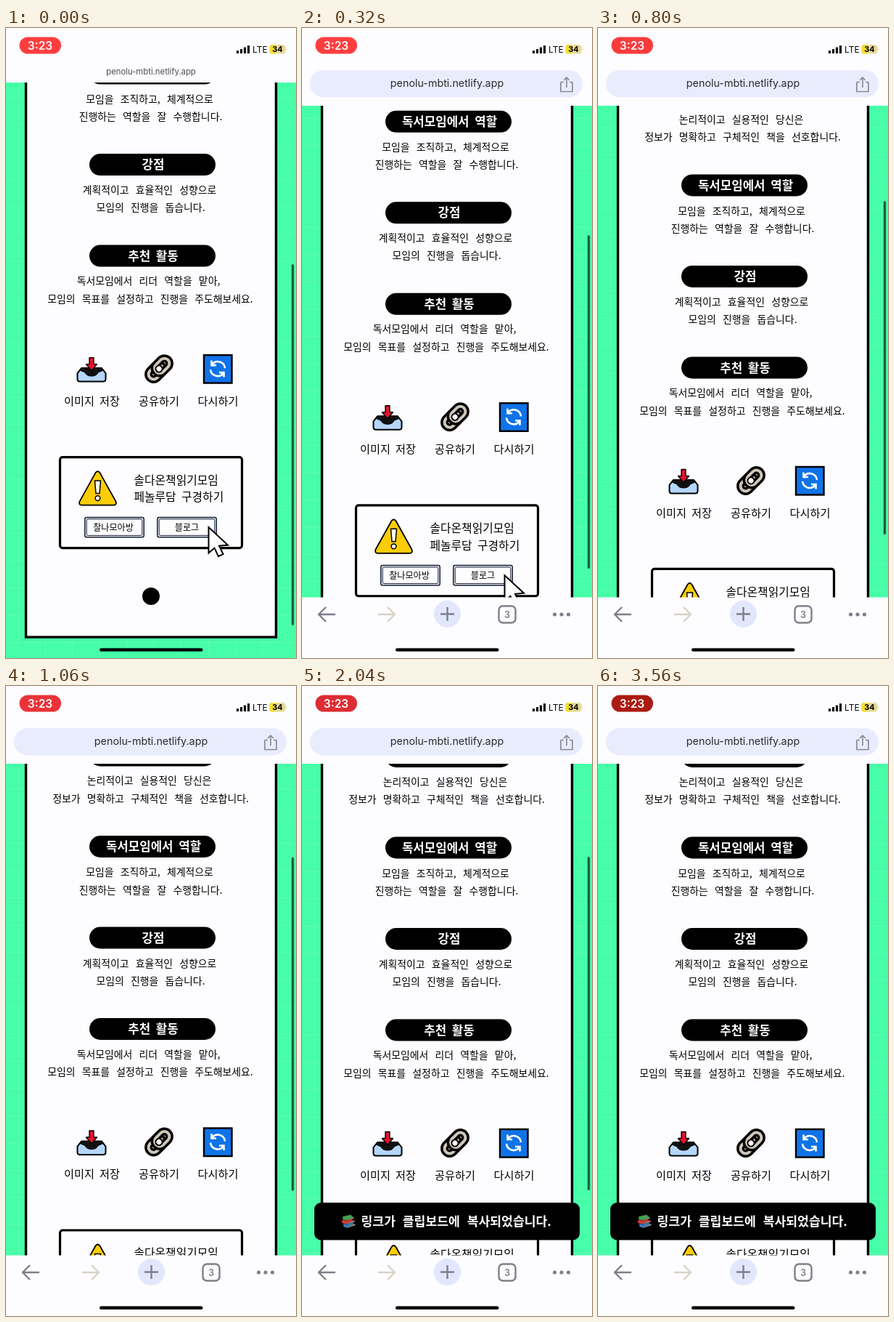
Write an HTML page that moves like this. It is 400 by 867 pixels and loops after 3.58 s.

```html
<!DOCTYPE html>
<html lang="ko">
<head>
<meta charset="utf-8">
<title>독서모임 유형</title>
<style>
html, body { margin: 0; width: 100%; height: 100%; overflow: hidden; background: #fdfcff; }
svg { display: block; width: 400px; height: 867px; font-family: "Noto Sans CJK KR", "Noto Sans CJK", sans-serif; font-weight: 500; }
.mid { text-anchor: middle; }
.copy { font-size: 13.9px; word-spacing: 5.3px; }
.title { font-size: 16.8px; font-weight: 700; fill: #fff; word-spacing: 3px; }
.note { font-size: 17.2px; font-weight: 700; fill: #fff; word-spacing: 5px; }
.label { font-size: 15.2px; word-spacing: 3px; }
.club { font-size: 15.8px; word-spacing: 3px; }
.btn { font-size: 12.1px; }
.ui { font-family: Inter, sans-serif; }
.ink { stroke: #000; stroke-linejoin: round; }

.page, .thumb, .head, .bar, .field, .url, .rec, .toast { animation: 3580ms linear infinite; }
.page { animation-name: scroll; }
.thumb { animation-name: thumb, hide; animation-duration: 3580ms, 3580ms; }
.head { animation-name: head; }
.bar { animation-name: bar; }
.field { animation-name: field; }
.url { animation-name: url; }
.rec { animation-name: rec; }
.toast { animation-name: toast; }

@keyframes scroll {
  0% { transform: translateY(0); animation-timing-function: cubic-bezier(.333,.129,.667,.515); }
  8.939% { transform: translateY(66px); animation-timing-function: cubic-bezier(.333,.37,.667,.744); }
  15.084% { transform: translateY(125.5px); animation-timing-function: cubic-bezier(.25,.75,.5,1); }
  29.609% { transform: translateY(158.5px); animation-timing-function: ease-out; }
  36.313%, 100% { transform: translateY(160px); }
}
@keyframes thumb {
  0% { transform: translateY(325px); height: 497px; animation-timing-function: cubic-bezier(.333,.129,.667,.515); }
  8.939% { transform: translateY(285.2px); height: 459px; animation-timing-function: cubic-bezier(.333,.37,.667,.744); }
  15.084% { transform: translateY(253.4px); height: 459px; animation-timing-function: cubic-bezier(.25,.75,.5,1); }
  29.609% { transform: translateY(235.7px); height: 459px; animation-timing-function: ease-out; }
  36.313%, 100% { transform: translateY(235px); height: 459px; }
}
@keyframes hide {
  0%, 82% { opacity: 1; }
  89%, 100% { opacity: 0; }
}
@keyframes head {
  0% { transform: translateY(-32px); animation-timing-function: cubic-bezier(.333,.129,.667,.515); }
  8.939%, 100% { transform: none; }
}
@keyframes bar {
  0% { transform: translateY(84px); animation-timing-function: cubic-bezier(.333,.129,.667,.515); }
  8.939%, 100% { transform: none; }
}
@keyframes field {
  0% { opacity: 0; transform: translateY(-16px); animation-timing-function: cubic-bezier(.333,.129,.667,.515); }
  8.939%, 100% { opacity: 1; transform: none; }
}
@keyframes url {
  0% { transform: translate(200px,60px) scale(.79); fill: #4c4c50; animation-timing-function: cubic-bezier(.333,.129,.667,.515); }
  8.939%, 100% { transform: translate(200px,76px) scale(1); fill: #2b2b30; }
}
@keyframes rec {
  0%, 20% { fill: #ff3d3f; }
  29.6% { fill: #ec3338; }
  43.6% { fill: #ac1b12; }
  57% { fill: #dc2d35; }
  64%, 78% { fill: #ff3d3f; }
  85.5% { fill: #ec3338; }
  99.4%, 100% { fill: #ac1b12; }
}
@keyframes toast {
  0%, 40.2% { opacity: 0; transform: translateY(10px); animation-timing-function: ease-out; }
  45.8%, 100% { opacity: 1; transform: none; }
}
</style>
</head>
<body>
<svg viewBox="0 0 400 867">
  <defs>
    <pattern id="grid" x="16" y="20" width="37.5" height="37.5" patternUnits="userSpaceOnUse">
      <path d="M.5 0V37.5M0 .5H37.5" stroke="#5cfdb2" fill="none"/>
    </pattern>
    <rect id="pill" x="115" y="-15" width="174" height="30" rx="15"/>
    <rect id="link" x="-11.5" y="-7" width="23" height="14" rx="7"/>
    <g id="frame" fill="none" stroke="#111a33">
      <rect x=".8" y=".8" width="81.4" height="27.4" rx="2.5" stroke-width="1.5"/>
      <rect x="3.2" y="3.2" width="76.6" height="22.6" rx="1.5"/>
    </g>
    <path id="turn" d="M10 -1A10 10 0 0 0 -7.5 -6.5M-8.5 -11.5V-5H-2" fill="none" stroke="#fff" stroke-width="2.6"/>
  </defs>

  <rect width="400" height="867" fill="#46fda8"/>
  <g class="page">
    <rect y="-180" width="400" height="1060" fill="url(#grid)"/>
    <rect x="27.5" y="-200" width="345" height="1038.2" fill="#fdfcff" stroke="#000" stroke-width="3.4"/>

    <use href="#pill" y="-63"/>
    <use href="#pill" y="62.5"/>
    <use href="#pill" y="188"/>
    <use href="#pill" y="313.5"/>
    <g class="title mid">
      <text x="203.5" y="62.5" dy=".36em">독서모임에서 역할</text>
      <text x="203" y="188" dy=".36em">강점</text>
      <text x="203" y="313.5" dy=".36em">추천 활동</text>
    </g>
    <g class="copy mid">
      <text x="197.5" y="-28.5" dy=".37em">논리적이고 실용적인 당신은</text>
      <text x="199.5" y="-4" dy=".37em">정보가 명확하고 구체적인 책을 선호합니다.</text>
      <text x="198" y="97.5" dy=".37em">모임을 조직하고, 체계적으로</text>
      <text x="199.5" y="122" dy=".37em">진행하는 역할을 잘 수행합니다.</text>
      <text x="198" y="223" dy=".37em">계획적이고 효율적인 성향으로</text>
      <text x="199.5" y="247" dy=".37em">모임의 진행을 돕습니다.</text>
      <text x="196.5" y="348" dy=".37em">독서모임에서 리더 역할을 맡아,</text>
      <text x="199" y="372.5" dy=".37em">모임의 목표를 설정하고 진행을 주도해보세요.</text>
    </g>

    <g class="ink" stroke-width="2">
      <path d="M104 468H132L137.5 475V483Q137.5 486.5 134 486.5H102Q98.5 486.5 98.5 483V475Z" fill="#b4d6fa"/>
      <path d="M104 468H132L134 471L127 474Q125 479 118 479T109 474L102 471Z" fill="#111" stroke-width="1"/>
      <path d="M115 453.5h6v9h4.5l-7.5 9-7.500-9h4.500z" fill="#e3122c" stroke-width="1.4"/>
    </g>
    <g transform="translate(211 469) rotate(-45)" fill="none">
      <g stroke="#000" stroke-width="11"><use href="#link" x="-6"/></g>
      <g stroke="#cfc8ba" stroke-width="4"><use href="#link" x="-6"/></g>
      <g stroke="#000" stroke-width="11"><use href="#link" x="6"/></g>
      <g stroke="#cfc8ba" stroke-width="4"><use href="#link" x="6"/></g>
      <circle r="4.5" fill="#fdfcff" stroke="#000" stroke-width="2"/>
    </g>
    <rect x="273" y="450" width="38.5" height="38.5" fill="#0f73e8" stroke="#000" stroke-width="2.4"/>
    <use href="#turn" transform="translate(292 469)"/>
    <use href="#turn" transform="translate(292 469) rotate(180)"/>
    <g class="label mid">
      <text x="118.5" y="513" dy=".37em">이미지 저장</text>
      <text x="211" y="513" dy=".37em">공유하기</text>
      <text x="292.5" y="513" dy=".37em">다시하기</text>
    </g>

    <rect x="74.5" y="590.5" width="251" height="125" rx="3.5" fill="#fdfcff" stroke="#000" stroke-width="3.2"/>
    <g class="ink" stroke-width="1.8">
      <path d="M123.5 612Q126.5 608 129.5 612L151.5 651.5Q153 656 149 656.5H104Q100 656 101.5 651.5Z" fill="#fbcd08"/>
      <path d="M122.5 623H130.5L129 640.5H124Z" fill="#fff" stroke-width="1.5"/>
      <circle cx="126.5" cy="647" r="3.4" fill="#fff" stroke-width="1.5"/>
    </g>
    <g class="club">
      <text x="176.5" y="622" dy=".37em">솔다온책읽기모임</text>
      <text x="176.5" y="645.5" dy=".37em">페놀루담 구경하기</text>
    </g>
    <use href="#frame" x="108" y="672.5"/>
    <use href="#frame" x="208" y="672.5"/>
    <g class="btn mid">
      <text x="148" y="687" dy=".37em">찰나모아방</text>
      <text x="249.5" y="687" dy=".37em">블로그</text>
    </g>
    <path d="M279.5 687V722.5L287.5 715.5L293 727L299.5 724L294 712.5L306 711.5Z" fill="#fff" stroke="#000" stroke-width="2"/>
    <circle cx="200" cy="782" r="12"/>
  </g>

  <rect class="thumb" x="393.8" width="3.4" rx="1.7" fill="#000" fill-opacity=".62"/>

  <g class="toast">
    <rect x="17" y="711" width="366" height="51.5" rx="9"/>
    <g transform="translate(54 727)" stroke="#2a1712" stroke-width=".5">
      <path d="M3 13L14 10L20 15L8 19L3 17Z" fill="#2f7fc4"/>
      <path d="M8 17.5L19.5 13.5V15L8 18.5Z" fill="#f3ead8"/>
      <path d="M1 8L13 5.5L19 10L7 14L1 12Z" fill="#d93a34"/>
      <path d="M7 12.5L18.5 9V10.5L7 13.5Z" fill="#f3ead8"/>
      <path d="M2 3L13 .5L18 5L7 9L2 7Z" fill="#3fa650"/>
      <path d="M7 7.5L17.5 4V5.5L7 8.5Z" fill="#f3ead8"/>
    </g>
    <text class="note" x="81.5" y="737" dy=".36em">링크가 클립보드에 복사되었습니다.</text>
  </g>

  <rect class="head" width="400" height="107" fill="#fdfcff"/>
  <g class="field">
    <rect x="11" y="58" width="376" height="37.5" rx="18.7" fill="#e9ecfd"/>
    <path d="M361 74.5H357V87.5H373V74.5H369M365 82V68.5M361 72L365 68L369 72" fill="none" stroke="#8b8b96" stroke-width="1.7" stroke-linejoin="round"/>
  </g>
  <text class="url ui mid" dy=".35em" font-size="14.3" font-weight="400">penolu-mbti.netlify.app</text>

  <rect class="rec" x="18.5" y="12.5" width="57.5" height="23" rx="11.5"/>
  <text class="ui mid" x="47" y="24" dy=".36em" fill="#fff" font-size="15.5" font-weight="600">3:23</text>
  <path d="M319.5 35V31M324.5 35V29M329.5 35V26.5M334.5 35V24" stroke="#0a0a0a" stroke-width="3.2"/>
  <text class="ui" x="340" y="29.5" dy=".36em" font-size="12" font-weight="400">LTE</text>
  <rect x="363.5" y="23" width="22" height="12.5" rx="4" fill="#e6dc9a"/>
  <path d="M371.5 23H367.5Q363.5 23 363.5 27V31.5Q363.5 35.5 367.5 35.5H371.5Z" fill="#f4dc2c"/>
  <path d="M386.5 27Q388.5 29.2 386.5 31.5Z" fill="#d9d2a0"/>
  <text class="ui mid" x="374.5" y="29.3" dy=".36em" font-size="11" font-weight="700">34</text>

  <g class="bar">
    <rect y="783.5" width="400" height="84" fill="#fdfcff"/>
    <g fill="none" stroke="#7f7e8b" stroke-width="2.4">
      <path d="M46 807H23M33 797L23 807L33 817"/>
      <path d="M105 807H128M118 797L128 807L118 817" stroke="#d8d2c6"/>
      <circle cx="200.5" cy="806.5" r="18.5" fill="#e3e7fd" stroke="none"/>
      <path d="M191 806.5H210M200.5 797V816"/>
      <rect x="271.5" y="795.5" width="23" height="23" rx="5.5"/>
    </g>
    <text class="ui mid" x="283" y="807" dy=".36em" fill="#7f7e8b" font-size="12.5" font-weight="600">3</text>
    <g fill="#7f7e8b">
      <circle cx="348.5" cy="807" r="2.6"/>
      <circle cx="358" cy="807" r="2.6"/>
      <circle cx="367.5" cy="807" r="2.6"/>
    </g>
  </g>
  <rect x="129" y="853.5" width="142.5" height="4.6" rx="2.3"/>
</svg>
</body>
</html>
```
